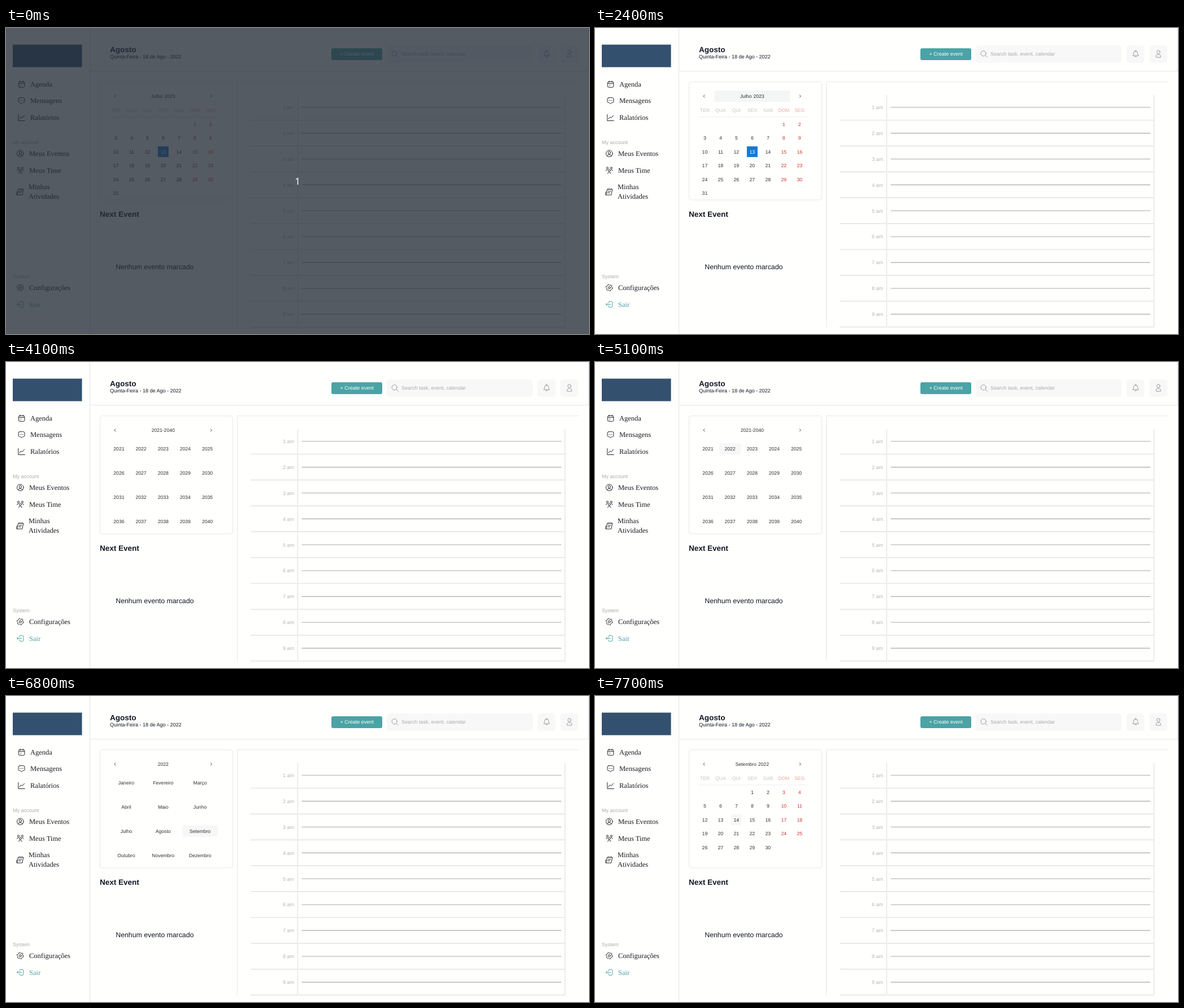
An HTML page that plays this animation: 1032 px wide and 543 px high, repeating every 8000 ms.

```html
<!DOCTYPE html>
<html lang="pt">
<head>
<meta charset="utf-8">
<title>Agenda</title>
<style>
  html, body { margin: 0; width: 100%; height: 100%; overflow: hidden; background: #fffffd; }
  svg { display: block; width: 100vw; height: 100vh; text-rendering: geometricPrecision; }
  text { font: 9px "Liberation Sans", Arial, sans-serif; fill: #101623; }
  .menu text { font: 12.5px "Liberation Serif", "Times New Roman", serif; fill: #171b22; }
  .menu .out { fill: #4ba3a5; }
  .bold { font-weight: bold; font-size: 13.5px; }
  .soft { fill: #a9abab; }
  .hour { fill: #b3b6b7; text-anchor: end; }
  .cal text { font-size: 8.6px; text-anchor: middle; fill: #2c2f33; word-spacing: .7px; }
  .cal .week { fill: #c3c6c7; }
  .cal .weekoff { fill: #e6aaa6; }
  .cal .off { fill: #cf2f2b; }
  .cal .now { fill: #fff; }
  .icon { fill: none; stroke: #22262d; stroke-width: 1; stroke-linecap: round; stroke-linejoin: round; }
</style>
</head>
<body>
<svg viewBox="0 0 1032 543" preserveAspectRatio="none">
  <rect width="1032" height="543" fill="#fffffd"/>
  <path d="M148.5 0V543M148 76.5H1032M1031.5 0V76" stroke="#e4e6e8" fill="none"/>
  <rect x="12" y="29.5" width="122.5" height="40" fill="#33506f"/>

  <g class="menu">
    <text x="43" y="103.7">Agenda</text>
    <text x="43" y="133.3">Mensagens</text>
    <text x="43" y="163">Ralatórios</text>
    <text x="41" y="226.9">Meus Eventos</text>
    <text x="41" y="256.6">Meus Time</text>
    <text x="40" y="286.3">Minhas</text>
    <text x="40" y="302.9">Atividades</text>
    <text x="41" y="464.8">Configurações</text>
    <text x="41" y="494.5" class="out">Sair</text>
  </g>
  <text x="12" y="205.7" class="soft">My account</text>
  <text x="12" y="443.5" class="soft">System</text>

  <g class="icon">
    <rect x="22.3" y="95.3" width="10.6" height="10" rx="2.2"/>
    <path d="M22.5 98.4H32.7M25 94V96.3M30.2 94V96.3M25.2 101.2h.1M27.6 101.2h.1M25.2 103.2h.1"/>
    <path d="M24.4 123.7H30.6Q33 123.7 33 126V130.2Q33 132.5 30.6 132.5H29.6L27.5 134.8L25.4 132.5H24.4Q22 132.5 22 130.2V126Q22 123.7 24.4 123.7Z"/>
    <path d="M25 128.4h.1M27.5 128.4h.1M30 128.4h.1" stroke-width="1.2"/>
    <path d="M21.8 153.5V164.5H33.3M23.8 161.5L26.6 157.8L28.8 159.6L32.6 155"/>
    <circle cx="25.3" cy="222.8" r="5.8"/><circle cx="25.3" cy="221.4" r="2.2"/>
    <path d="M21.6 227Q22.2 224.6 25.3 224.6T29 227"/>
    <circle cx="25.3" cy="252.7" r="1.9"/><circle cx="21.9" cy="248.5" r="1.6"/><circle cx="28.7" cy="248.5" r="1.6"/>
    <path d="M22.6 258.2Q22.8 255.6 25.3 255.6T28 258.2M19.6 253.3Q19.6 251.4 21.8 251.4M31 253.3Q31 251.4 28.8 251.4"/>
    <path d="M22 286.2H30.8L28.8 296.2H19.8ZM22.9 289.7H28M22.2 292.4H26.4M23.4 285.2V286.6M26.2 285.2V286.6M29 285.2V286.6M19 291V296.2H20"/>
    <path id="gear"/><circle cx="25.2" cy="460.8" r="1.9"/>
    <path d="M24 488.2V487.3Q24 485.3 26 485.3H28.8Q30.8 485.3 30.8 487.3V493.6Q30.8 495.6 28.8 495.6H26Q24 495.6 24 493.6V492.7M27.5 490.4H19.5M21.5 488.3L19.4 490.4L21.5 492.5" stroke="#4ba3a5"/>
  </g>

  <text x="184" y="43.1" class="bold">Agosto</text>
  <text x="184" y="54.3">Quinta-Feira - 18 de Ago - 2022</text>
  <rect x="576" y="36" width="90" height="21" rx="3" fill="#4ba3a5"/>
  <text x="591.4" y="49.4" style="fill:#fff">+ Create event</text>
  <g fill="#f8f8f8">
    <rect x="674" y="31" width="258" height="31" rx="5"/>
    <rect x="941" y="31" width="31.5" height="31" rx="5"/>
    <rect x="981.5" y="31" width="31.5" height="31" rx="5"/>
  </g>
  <text x="700" y="49.4" class="soft">Search task, event, calendar</text>
  <g class="icon" style="stroke:#8d8f91;stroke-width:.9">
    <circle cx="687.6" cy="45.2" r="4.6"/><path d="M691 48.6L694.4 52"/>
    <path d="M952 48.8Q953.5 47.4 953.5 44.6Q953.5 40.6 957 40.6T960.5 44.6Q960.5 47.4 962 48.8ZM957 39.6V42.4M955.3 50.6Q957 52.2 958.7 50.6"/>
    <circle cx="997.3" cy="42.6" r="2.9"/>
    <path d="M993.3 51.6Q992.6 47.4 995.6 47.1H999Q1002 47.4 1001.3 51.6Z"/>
  </g>

  <rect x="166.5" y="95.5" width="235" height="209.5" rx="4" fill="none" stroke="#e5e7e9"/>
  <g class="cal" id="cal"></g>
  <path class="icon" d="M194 118.8L191.9 121L194 123.2M362.2 118.8L364.3 121L362.2 123.2" style="stroke:#4a4d50"/>

  <text x="166" y="335.3" class="bold">Next Event</text>
  <text x="194.3" y="428.4" style="font-size:12.3px">Nenhum evento marcado</text>

  <path d="M409.5 531V95.5H1014" fill="none" stroke="#e6e7e8"/>
  <path d="M516.5 119V531M989.5 119V531" stroke="#dcdddd"/>
  <g id="hours"></g>

  <g id="veil">
    <rect width="1032" height="543" fill="rgb(38,46,57)" opacity=".78"/>
    <text x="516" y="278" text-anchor="middle" style="font:17px 'Noto Sans',sans-serif;fill:#fff">1</text>
  </g>
</svg>
<script>
const LOOP = 8000;
const $ = id => document.getElementById(id);
const label = (x, y, s, cls = "") => `<text x="${x}" y="${y}" class="${cls}">${s}</text>`;
const box = (cx, cy, w, h, fill) =>
  `<rect x="${cx - w / 2}" y="${cy - h / 2}" width="${w}" height="${h}" fill="${fill}"/>`;
const range = (n, f) => Array.from({ length: n }, (_, i) => f(i));

const WEEK = "TER QUA QUI SEX SAB DOM SEG".split(" ");
const MONTHS = ("Janeiro Fevereiro Março Abril Maio Junho Julho Agosto " +
  "Setembro Outubro Novembro Dezembro").split(" ");
const HOVER = "#f7f7f8";

function head(text, hover) {
  const back = hover === "title"
    ? '<rect x="211.5" y="111" width="133.5" height="20" rx="1.5" fill="#f4f6f6"/>' : "";
  return back + label(278.2, 124.2, text);
}

function days(title, skip, count, today) {
  return hover => {
    const colX = c => 194.4 + 27.97 * c;
    let out = head(title, hover) + '<path d="M182 157.8H376.5" stroke="#eeeff0"/>';
    WEEK.forEach((w, c) => out += label(colX(c), 148.6, w, c > 4 ? "weekoff" : "week"));
    for (let d = 1; d <= count; d++) {
      const k = d + skip - 1, c = k % 7;
      const x = colX(c), y = 170.9 + 24.43 * Math.floor(k / 7);
      if (d === today) out += box(x, y - .2, 19, 19, "#1a78d2");
      else if (d === hover) out += box(x, y - .2, 19, 19, HOVER);
      out += label(x, y + 3.1, d, d === today ? "now" : c > 4 ? "off" : "");
    }
    return out;
  };
}

function tiles(title, items, cols, x0, step, w) {
  return hover => head(title, hover) + items.map((s, i) => {
    const x = x0 + step * (i % cols), y = 153.9 + 42.9 * Math.floor(i / cols);
    return (s === hover ? box(x, y, w, 20, HOVER) : "") + label(x, y + 3.1, s);
  }).join("");
}

const july = days("Julho 2023", 5, 31, 13);
const september = days("Setembro 2022", 3, 30, 0);
const years = tiles("2021-2040", range(20, i => 2021 + i), 5, 199.9, 39.15, 37.5);
const months = tiles("2022", MONTHS, 3, 212.9, 65.3, 62.5);

// time, view, hovered item
const STEPS = [
  [0, july], [2400, july, "title"],
  [3100, years, "title"], [3400, years, 2029], [3700, years, 2023], [4000, years],
  [4400, years, 2022], [4700, years, 2023], [5100, years, 2022],
  [5400, months], [5700, months, "title"], [5800, months, "Maio"],
  [5900, months, "Novembro"], [6000, months], [6800, months, "Setembro"],
  [7000, september, 24], [7100, september, 23], [7200, september, 22],
  [7300, september, 21], [7600, september, 14]
];

$("hours").innerHTML = range(9, i => {
  const y = 140.7 + 45.9 * i;
  return label(510, y + 3.2, `${i + 1} am`, "hour") +
    `<path d="M523.5 ${y}H983" stroke="#a9aaab" stroke-width="1.1"/>` +
    `<path d="M433 ${y + 22.8}H516M518 ${y + 22.8}H989" stroke="#dcdddd" stroke-width="1.2"/>`;
}).join("");

$("gear").setAttribute("d", "M" + range(24, i => {
  const a = (i + .5) * Math.PI / 12, r = i % 4 < 2 ? 5.9 : 4.5;
  return `${(25.2 + r * Math.cos(a)).toFixed(2)} ${(460.8 + r * Math.sin(a)).toFixed(2)}`;
}).join("L") + "Z");

let shown = null;
function draw(t) {
  $("veil").style.display = t < 100 ? "" : "none";
  const step = STEPS.filter(s => s[0] <= t).pop();
  if (step === shown) return;
  shown = step;
  $("cal").innerHTML = step[1](step[2]);
}

const start = performance.now();
function tick() {
  draw((performance.now() - start) % LOOP);
  requestAnimationFrame(tick);
}
draw(0);
requestAnimationFrame(tick);
</script>
</body>
</html>
```
